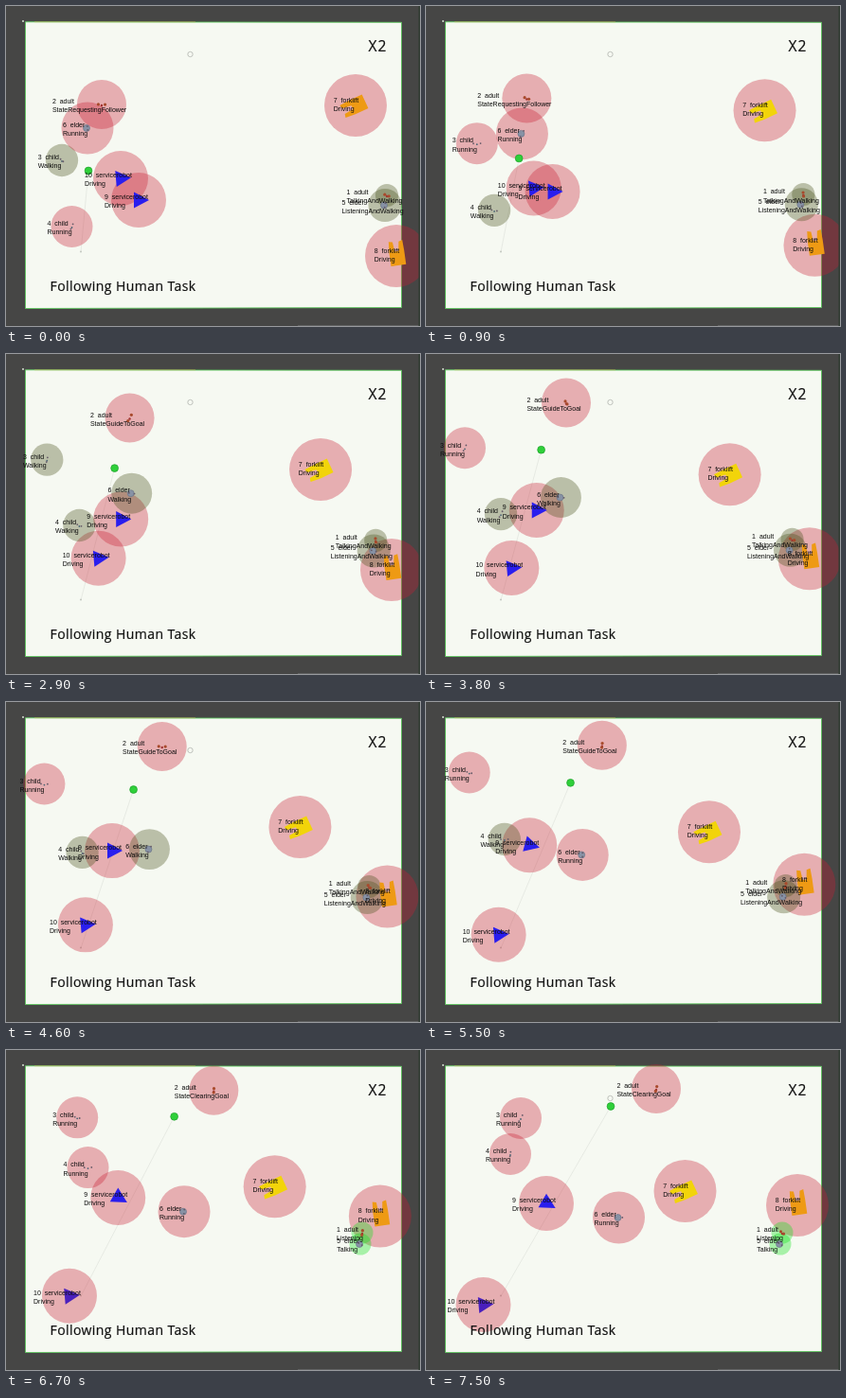
An HTML page for the animation above (7600 ms loop, 437 by 338 pixels).

```html
<!DOCTYPE html>
<html lang="en">
<head>
<meta charset="utf-8">
<title>Following Human Task</title>
<style>
  html, body { margin: 0; width: 100%; height: 100%; overflow: hidden; background: #464645; }
  svg { display: block; width: 437px; height: 338px; }
  .label text { font: 7px "Liberation Sans", Arial, sans-serif; fill: #0c0c0c; white-space: pre; }
  .title { font: 14px "Open Sans", "Noto Sans", sans-serif; letter-spacing: .42px; fill: #111; stroke: #111; stroke-width: .2; }
  .title.speed { font-size: 15.5px; letter-spacing: 1px; }
</style>
</head>
<body>
<svg viewBox="0 0 437 338">
  <rect width="437" height="338" fill="#464645"/>
  <path d="M20.5 16.8L417.5 17.3V318.5L20.5 319.5Z" fill="#f6f9f2" stroke="#5cc45c" stroke-width=".9"/>
  <path d="M30 16.8H200" stroke="#d9b55a" stroke-width=".7" opacity=".7"/>
  <path d="M308 337.6H436" stroke="#77797a" stroke-width=".6"/>
  <circle cx="18" cy="16" r=".9" fill="#e4f0e0"/>
  <circle id="goal" cx="194.5" cy="51" r="2.7" fill="none" stroke="#a9ada6" stroke-width=".7"/>
  <path id="route" stroke="#dce0d8" stroke-width=".6"/>
  <circle cx="79" cy="259.5" r="1" fill="#c3c7c0"/>
  <g id="discs" fill-opacity=".34"></g>
  <g id="marks"></g>
  <circle id="guide" r="3.9" fill="#2fd03a" stroke="#1f9f2c" stroke-width=".7"/>
  <path d="M436.2 0V338" stroke="#2f3a30" stroke-width="1.4"/>
  <g id="labels" class="label"></g>
  <text class="title" x="46.5" y="300.5">Following Human Task</text>
  <text class="title speed" x="382.5" y="48.3">X2</text>
</svg>
<script>
const LOOP = 7600, STEP = 100, LAST = LOOP - STEP;
const RED = 'rgb(200,30,50)', OLIVE = 'rgb(70,80,25)', GREEN = 'rgb(15,225,25)';
const ORANGE = '#ee9a14', YELLOW = '#f2d40a', BLUE = '#2a1eee', VIOLET = '#4a20bd';
const SIZE = { adult: 26, child: 22, elder: 27.5, forklift: 33, servicerobot: 29 };
const $ = id => document.getElementById(id);

function add(parent, tag, attrs = {}) {
  const node = document.createElementNS('http://www.w3.org/2000/svg', tag);
  set(node, attrs);
  return parent.appendChild(node);
}

function set(node, attrs) {
  for (const name in attrs) node.setAttribute(name, attrs[name]);
}

const clamp = v => Math.min(1, Math.max(0, v));

// Catmull-Rom curve through points that are evenly spaced in time.
function along(points, t, end = LAST) {
  const n = points.length - 1;
  const s = clamp(t / end) * n;
  const i = Math.min(n - 1, Math.floor(s)), u = s - i;
  return [0, 1].map(axis => {
    const b = points[i][axis], c = points[i + 1][axis];
    const a = i > 0 ? points[i - 1][axis] : 2 * b - c;
    const d = i + 2 <= n ? points[i + 2][axis] : 2 * c - b;
    return b + u / 2 * (c - a + u * (2 * a - 5 * b + 4 * c - d + u * (3 * (b - c) + d - a)));
  });
}

// Status changes: { start time: status }. Forklifts lie lowest, talkers highest.
const agents = [
  { id: 7, kind: 'forklift', path: [[369, 105], [273.5, 149]], status: { 0: 'Driving' },
    angle: () => 155, tint: t => t < 850 ? ORANGE : YELLOW },
  { id: 8, kind: 'forklift', path: [[412, 264], [405, 217], [392, 164]], status: { 0: 'Driving' },
    angle: () => -98, tint: () => ORANGE },
  { id: 9, kind: 'servicerobot', path: [[140, 205], [127, 186], [117, 165.5], [109.5, 151], [127, 162]],
    status: { 0: 'Driving' }, angle: t => 30 * clamp((t - 5100) / 800), tint: () => BLUE },
  { id: 10, kind: 'servicerobot', path: [[121, 182], [60.5, 269]],
    status: { 0: 'Driving' }, angle: () => -5, tint: t => t < 6100 ? BLUE : VIOLET },
  { id: 2, kind: 'adult', path: [[101, 104], [114.5, 88], [147, 52], [189, 45.5], [243, 41]],
    status: { 0: 'StateRequestingFollower', 950: 'StateGuideToGoal', 6100: 'StateClearingGoal' } },
  { id: 3, kind: 'child', path: [[59, 163], [48.5, 127], [41, 100], [47.5, 73.5], [100, 72]],
    status: { 0: 'Walking', 900: 'Running', 1800: 'Walking', 3600: 'Running' } },
  { id: 4, kind: 'child', path: [[69.5, 233], [76.5, 187], [81.5, 153], [89, 110]],
    status: { 0: 'Running', 800: 'Walking', 6600: 'Running' } },
  { id: 6, kind: 'elder', path: [[86, 129], [127.5, 145], [157, 158], [203.5, 177]],
    status: { 0: 'Running', 2150: 'Walking', 4700: 'Running' } },
  { id: 5, kind: 'elder', size: 22.5, path: [[400, 210.5], [374, 205]], end: 6400,
    status: { 0: 'ListeningAndWalking', 6400: 'Talking' } },
  { id: 1, kind: 'adult', size: 15.5, path: [[402, 200], [376, 193]], end: 6400,
    status: { 0: 'TalkingAndWalking', 6400: 'Listening' } }
];
const leader = agents.find(agent => agent.id === 2);
const guidePath = [[87, 174], [109, 145], [121, 102], [155, 84], [195, 59.5]];

const statusAt = (status, t) => status[Object.keys(status).filter(start => start <= t).pop()];

// Walkers get a smaller olive disc, talkers a small green one.
function discStyle(agent, status) {
  const size = agent.size || SIZE[agent.kind];
  if (status.endsWith('Walking')) return { r: size * .78, fill: OLIVE };
  if (/^(Talking|Listening)$/.test(status)) return { r: 11.5, fill: GREEN };
  return { r: size, fill: RED };
}

const bodies = {
  forklift: mark => add(mark, 'path', { d: 'M-10 -8H5L16 -7L15 -3L5 -2V2L15 3.5L16 7.5L5 8H-10Z' }),
  servicerobot: mark => add(mark, 'path', { d: 'M10 0L-6 8.5V-8.5Z' }),
  elder: mark => add(mark, 'circle', { cx: -1, r: 3.5, fill: '#8792a5', stroke: '#667084', 'stroke-width': .6 }),
  adult: mark => add(mark, 'circle', { cy: 1, r: 1.2, fill: '#a03432' }),
  child: mark => add(mark, 'circle', { cy: 1, r: .9, fill: '#4b6574' })
};

for (const agent of agents) {
  agent.disc = add($('discs'), 'circle');
  agent.mark = add($('marks'), 'g');
  bodies[agent.kind](agent.mark);
  if (!agent.angle) {
    const foot = agent.kind === 'adult' ? { r: 1.6, fill: '#a84a2c' } : { r: .9, fill: '#665a68' };
    agent.feet = [-1, 1].map(side => ({ side, node: add(agent.mark, 'circle', foot) }));
  }
  agent.label = add($('labels'), 'g');
  agent.lines = [0, 9.2].map(y => add(agent.label, 'text', { y }));
  agent.lines[0].textContent = `${agent.id}  ${agent.kind}`;
}

function drawLabel(agent, x, y, status) {
  agent.lines[1].textContent = status;
  const width = Math.max(...agent.lines.map(line => line.getComputedTextLength()));
  const [gap, rise] = agent.kind === 'forklift' ? [10, 3] : [13, .7];
  set(agent.label, { transform: `translate(${x - width / 2 - gap} ${y - rise})` });
}

function drawAgent(agent, t) {
  const [x, y] = along(agent.path, t, agent.end);
  const status = statusAt(agent.status, t);
  set(agent.disc, { cx: x, cy: y, ...discStyle(agent, status) });
  drawLabel(agent, x, y, status);
  let pose = `translate(${x} ${y})`;
  if (agent.angle) {
    pose += ` translate(1 0) rotate(${agent.angle(t)})`;
    set(agent.mark, { fill: agent.tint(t) });
  } else {
    const swing = (agent.size ? 2 : 4) * Math.sin(t / 190 + agent.id);
    for (const { side, node } of agent.feet) {
      set(node, { cx: side * (1 + swing * .7), cy: side * (1.5 - swing * .4) });
    }
  }
  set(agent.mark, { transform: pose });
}

function draw(t) {
  agents.forEach(agent => drawAgent(agent, t));
  const [x, y] = along(guidePath, t);
  set($('guide'), { cx: x, cy: y });
  set($('route'), { d: `M79 260L${x} ${y}` });
  const [lx, ly] = along(leader.path, t);
  set($('goal'), { opacity: Math.hypot(lx - 194.5, ly - 51) < 28 ? 0 : 1 });
}

const begin = performance.now();
function tick() {
  const t = (performance.now() - begin) % LOOP;
  draw(Math.floor(t / STEP) * STEP);
  requestAnimationFrame(tick);
}
tick();
</script>
</body>
</html>
```
